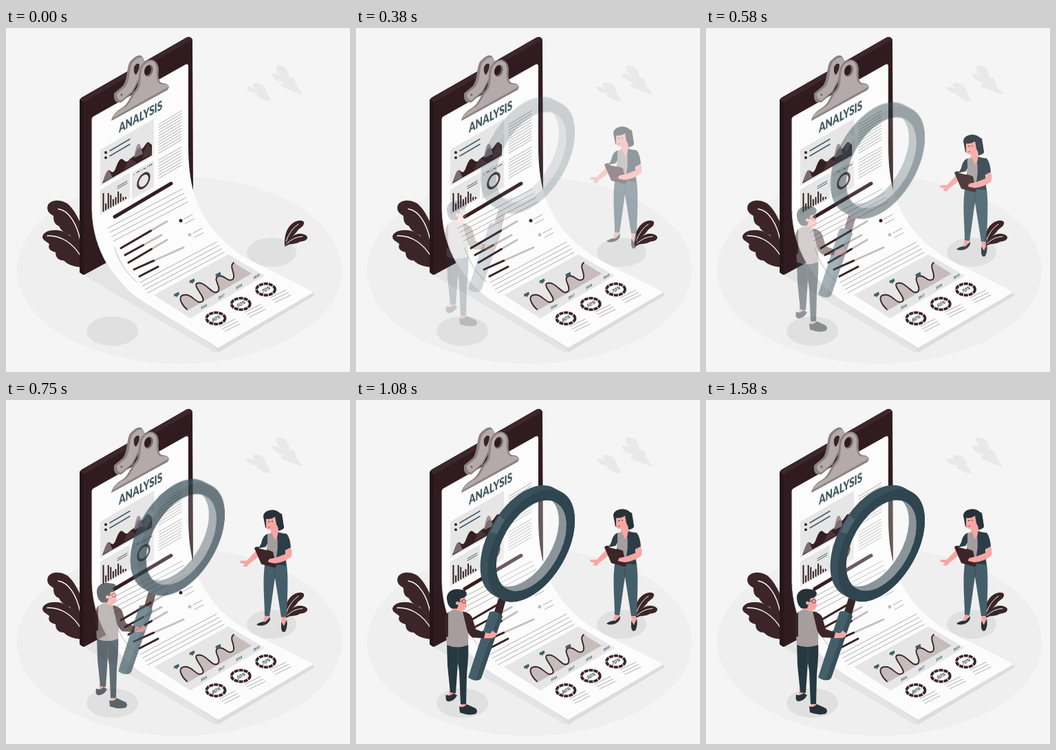
Write an HTML page that moves like this. It is 500 by 500 pixels and loops after 1620 ms.

```html
<!DOCTYPE html>
<html lang="en">
<head>
<meta charset="utf-8">
<title>Analysis</title>
<style>
html,body{margin:0;width:100%;height:100%;overflow:hidden;background:#f5f5f5}
svg{display:block;width:100vw;height:100vh}
text{font-family:Lato,sans-serif;font-weight:900;fill:#455a64}
.r{stroke-linecap:round;stroke-linejoin:round;fill:none}
</style>
</head>
<body>
<svg viewBox="0 0 500 500">
<!-- floor -->
<ellipse cx="252" cy="352" rx="236" ry="136" fill="#efefef"/>
<g fill="#e0e0e0">
  <ellipse cx="154.700" cy="440.500" rx="37.500" ry="21.500"/>
  <ellipse cx="386" cy="326" rx="36" ry="21"/>
  <path d="M113 359L147 338L215 390L310 467L304 472L200 411Z" fill="#e4e4e4"/>
</g>
<g fill="#e9e9e9">
  <path d="M386 67C392 65 398 68 403 72C396 67 391 61 393 55C401 53 411 58 412 72C417 71 421 75 421 82L432 97C424 95 412 90 402 86C397 84 400 80 405 79C397 79 389 75 386 67Z"/>
  <path d="M349 86C354 84 360 87 364 90C359 86 357 82 360 80C369 79 376 82 378 92L386 106C378 108 372 103 366 99C363 98 364 96 367 95C359 95 352 93 349 86Z"/>
</g>
<!-- plants -->
<g fill="#3b2528">
  <path d="M110 287C104 275 99 263 89 255C79 249 66 249 61 257C58 265 63 270 69 273C69 280 70 285 77 288C80 294 85 298 93 301L111 329Z"/>
  <path d="M111 325C104 311 94 300 81 295C68 292 55 295 53 303C53 309 59 310 63 314C60 322 66 324 72 326C72 335 78 338 84 338C91 345 100 347 111 348Z"/>
  <path d="M405 318C404 304 407 293 414 286C421 279 430 278 433 282C434 288 428 290 424 294C421 300 412 305 408 312Z"/>
  <path d="M406 318C409 306 419 298 429 299C437 300 440 304 437 307C434 311 429 309 425 312C419 315 412 312 406 318Z"/>
</g>
<g class="r" stroke="#fff" stroke-width="1.400">
  <path d="M76 263C91 265 103 284 108 309M60 302C78 301 97 311 110 334"/>
  <path d="M407 310Q413 293 425 285M409 313Q417 304 431 303" stroke-width="1"/>
</g>
<!-- board -->
<path d="M107 107Q107 103 110 101L262 14Q268 11 271 17L272 236L240 288L150 339L115 358Q112 360 107 355Z" fill="#301c20"/>
<path d="M107 104L113 108V359L107 355Z" fill="#26161a"/>
<path d="M107 104L113 108L265 20L271 17Q268 11 262 14Z" fill="#3c272b"/>
<!-- paper -->
<path d="M127 270C128 318 150 355 188 386L304 465L308 472L448 389L446 382L310 461L200 394Z" fill="#dcdcdc"/>
<path d="M125 132Q125 129 128 128L261 53Q265 51 265 56V170C265 200 268 222 273 239C284 277 311 312 350 335L447 384L308 465L199 398C158 371 126 323 125 264Z" fill="#fcfcfc"/>
<path d="M125 132V264C126 323 158 371 199 398L308 465" class="r" stroke="#e3e3e3"/>
<path d="M158 319C164 340 176 358 190 369" class="r" stroke="#a8a8a8" stroke-width=".8"/>
<text transform="matrix(.73 -.4 0 1 164 152.500)" font-size="18.500">ANALYSIS</text>
<!-- wall panels -->
<g fill="#e6e6e6">
  <path d="M137 177L215 132V186L137 230Z"/>
  <path d="M137 235L180 210V247L137 272Z"/>
  <path d="M183 210L215 192V231L183 249Z"/>
</g>
<path d="M140 226C144 214 147 205 151 207C154 210 156 211 159 205C163 194 166 188 170 191C174 195 176 195 179 192C183 187 185 188 188 184C191 174 194 173 197 176C201 174 204 165 207 166C210 167 211 171 212 169V185Z" fill="#341f23"/>
<path d="M141 224C144 213 147 204 150 207C153 212 153 214 155 217ZM186 189C188 177 190 168 193 168C197 170 197 178 199 183Z" fill="#8d8082" opacity=".8"/>
<path d="M171 207C176 196 179 188 182 190C186 194 187 194 190 196ZM198 190C201 180 203 170 207 167C210 171 211 178 212 184Z" fill="#583f43" opacity=".65"/>
<g fill="#341f23"><circle cx="145" cy="181" r="2"/><circle cx="145" cy="188.500" r="2"/><circle cx="254" cy="280" r="2.500"/></g>
<circle cx="267" cy="300.500" r="2.500" fill="#c5bdbe"/>
<g class="r" stroke="#455a64" stroke-width="1.500">
  <path d="M151 178.500L180 161.500M151 186L180 169"/>
  <path d="M162 230.500L176 222.500M162 233.500L176 225.500" stroke-width="1"/>
  <path d="M186 213h.1M190 210L194 208M197 206.500h.1M200 205L203 203.500M206 201.500h.1M208 200.500L212 198" stroke-width="1.300"/>
</g>
<g id="bars" stroke="#341f23" stroke-width="2"></g>
<circle r="9.700" transform="matrix(.866 -.5 0 1 200 222)" fill="none" stroke="#4a3438" stroke-width="3.200"/>
<g id="lines" class="r" stroke="#a3a3a3" stroke-width=".9"></g>
<g id="meters" class="r" stroke-width="3"></g>
<!-- lower chart -->
<path d="M215 388L323 329L376 360L268 422Z" fill="#e6e6e6"/>
<path id="area" fill="#c6bcbd"/>
<path id="wave" class="r" stroke="#3b2528" stroke-width="1.900"/>
<g fill="#41606a">
  <path id="flag" d="M244 387L251 383.500L252 387L250 389L248 391.500L247 389.500L244.500 390.500Z"/>
  <use href="#flag" x="22.500" y="-19.500"/><use href="#flag" x="60.500" y="-29"/>
</g>
<g id="labels"></g>
<g id="gauges"></g>
<!-- clip -->
<path d="M157 95L170 84C177 74 175 58 180 49Q190 38 196 40C203 44 203 58 199 66L184 94L168 108Q158 110 157 101Z" fill="#8d8283"/>
<path d="M161 96L174 85C181 74 179 58 184 50Q192 41 198 43C203 48 201 58 197 65L183 92L168 105Q161 105 161 96Z" fill="#b4aaab"/>
<path d="M186 57Q190 49 194 53Q194 61 189 68Q185 66 186 57Z" fill="#3b2528"/>
<circle cx="168" cy="97" r="1.600" fill="#6b5f61"/>
<path d="M153 135C154 126 163 119 170 115C178 110 180 99 187 91C195 83 191 70 195 57Q201 45 212 46Q221 48 222 60C221 71 222 79 227 80Q236 80 237 86L235 90Z" fill="#8d8283"/>
<path d="M155 131C157 124 166 119 173 115C181 110 183 100 190 92C198 84 194 71 198 58Q203 48 212 48Q219 50 219 61C218 73 220 81 226 82Q234 81 237 85Z" fill="#b4aaab"/>
<ellipse cx="207.500" cy="62" rx="6" ry="9" transform="rotate(18 207.500 62)" fill="#756a6c"/>
<ellipse cx="206" cy="61.500" rx="4.600" ry="7.500" transform="rotate(18 206 61.500)" fill="#301c20"/>

<g id="woman">
  <path d="M374 168C374 160 386 156 394 160C403 164 402 174 404 184C401 189 393 190 388 187L377 184Z" fill="#263238"/>
  <path d="M378 171L391 168L395 173L396 190L391 197L385 193V187Q379 188 378 183Z" fill="#f7a6a3"/>
  <path d="M375 171Q385 173 391 168L393 179L397 187Q402 188 404 184L401 164L384 159Z" fill="#263238"/>
  <path d="M381 175.500h2.500M386 175h2" stroke="#263238" stroke-width="1"/>
  <path d="M381 183.500l3-.5" stroke="#b5504f" stroke-width="1"/>
  <path d="M376 312L373 324L380 324L383 311ZM400 311L401 328L407 328L407 311Z" fill="#f7a6a3"/>
  <path d="M364 325Q371 320 377 321L384 314Q385 321 377 325Q369 328 364 325ZM400 321L404 327L408 318Q410 327 406 335Q401 338 400 330Z" fill="#263238"/>
  <path d="M377 232L407 232C411 252 409 284 408 314L400 314L391 257C388 276 386 294 383 313L376 312C376 288 372 259 377 232Z" fill="#455f6a"/>
  <path d="M391 257L391 244" stroke="#344b55" stroke-width="1"/>
  <path d="M380 193L397 190L405 194L407 236L378 238Z" fill="#a59d9e"/>
  <path d="M380 193Q373 196 371 207L366 216L373 220L380 207ZM393 191L408 193Q413 199 414 213L406 217L407 239L390 238Q398 214 393 191Z" fill="#2c3d46"/>
  <path d="M386 191L395 189Q396 198 391 202Z" fill="#f7a6a3"/>
  <path d="M366 215L372 220Q364 230 354 236L350 241L344 240L347 237L340 235L341 232L350 232Z" fill="#f7a6a3"/>
  <path d="M361 214Q363 211 367 212L388 219L393 240Q392 243 389 242L371 237Z" fill="#3b2528"/>
  <path d="M367 214L377 212L379 217Z" fill="#f5f5f5"/>
  <path d="M407 217L414 213Q417 222 414 227Q403 235 390 236L381 234Q381 229 386 229L394 227L407 222Z" fill="#f7a6a3"/>
</g>

<g id="glass">
  <path d="M207 288L218 290L211 315L200 311Z" fill="#3b2528"/>
  <path d="M194 308Q203 304 213 314L182 404Q174 411 163 403Z" fill="#455f6a"/>
  <path d="M208 310Q211 311 213 314L182 404Q179 408 174 407Z" fill="#385059"/>
  <!-- wall plane; the back rim sits at (-12.7, -12.4) from the front one -->
  <g transform="matrix(.866 -.5 0 1 254.800 211.400)">
    <circle r="59" fill="#fff" opacity=".27"/>
    <path d="M35 -47.500A59 59 0 1 1 -47.700 34.700A59 59 0 0 0 35 -47.500Z" fill="#8b9599"/>
    <path fill-rule="evenodd" d="M51.100 -52.200L38.400 -64.600A73 73 0 0 0 -63.800 39.800L-51.100 52.200A73 73 0 0 0 51.100 -52.200ZM59 0A59 59 0 1 0 -59 0A59 59 0 1 0 59 0Z" fill="#3a515c"/>
    <path d="M-63 -50A65 65 0 0 1 -49 -65" fill="none" stroke="#4d6670" stroke-width="14"/>
    <circle r="66" fill="none" stroke="#2f454f" stroke-width="14"/>
  </g>
</g>

<g id="man">
  <path d="M136 419L135 430L143 429L144 417ZM152 438L153 449L161 447L160 436Z" fill="#f7a6a3"/>
  <path d="M131 428Q136 431 142 426L147 429Q143 437 135 438Q129 438 131 428ZM150 445Q156 448 161 442L174 448Q178 452 174 456Q164 459 151 454Z" fill="#263238"/>
  <path d="M132 353L163 351C164 373 162 386 161 400L160 442L152 442L150 394L148 382L145 426L137 425L133 386Z" fill="#263840"/>
  <path d="M148 382L148 362" stroke="#3c505a" stroke-width="1"/>
  <path d="M140 297L154 302L155 312L141 310Z" fill="#f7a6a3"/>
  <path d="M145 287L158 284L160 292L161 298Q160 306 153 306L143 302Z" fill="#f7a6a3"/>
  <path d="M132 289C131 279 140 273 150 275Q161 275 161 282Q159 288 152 288L149 297L147 303L139 303Q133 299 132 289Z" fill="#263238"/>
  <circle cx="147.500" cy="295" r="2.500" fill="#f7a6a3"/>
  <path d="M149 293L154 292" stroke="#263238" stroke-width=".8"/>
  <circle cx="156.800" cy="292.500" r="2.700" fill="none" stroke="#263238" stroke-width=".8"/>
  <path d="M134 308L142 304L155 308L164 316L163 356Q147 362 132 356Q129 325 134 308Z" fill="#a59d9e"/>
  <path d="M155 307Q166 309 169 316L174 333L188 338L186 346L169 345Q162 340 160 328Z" fill="#3b2528"/>
  <path d="M134 308Q129 313 130 325L131 344L134 344Z" fill="#3b2528"/>
  <path d="M188 338L195 339L199 335L202 338L205 339Q204 344 198 346L186 346Z" fill="#f7a6a3"/>
</g>
</svg>
<script>
const $ = id => document.getElementById(id);
const LOOP = 1620, BLANK = 130, DROP = 30;
const seg = (x1, y1, x2, y2, attrs = '') => `<path d="M${x1} ${y1}L${x2} ${y2}" ${attrs}/>`;

// rows of thin text lines: start, end, step, count
const rows = (x1, y1, x2, y2, dx, dy, n) => Array.from({length: n}, (_, i) =>
  seg(x1 + dx * i, y1 + dy * i, x2 + dx * i, y2 + dy * i)).join('');

$('lines').innerHTML = [
  [222, 140, 255, 120.500, 0, 4.200, 11],
  [222, 192, 255, 173, 0, 4.400, 7],
  [148, 291, 256, 234, 2.800, 6.200, 4],
  [195, 370, 306, 311, 3.700, 5, 4],
  [258, 278, 271, 271, 2, 6.500, 2],
  [272, 298, 285, 291, 2, 6.500, 2],
  [311, 434, 333, 423, 3.500, 3.500, 3],
  [347, 413, 370, 402, 3.500, 3.500, 3],
  [384, 392, 407, 381, 3.500, 3.500, 3]
].map(r => rows(...r)).join('');

$('bars').innerHTML = [27, 10, 23, 18, 10, 11, 17, 12, 5, 3].map((h, i) => {
  const x = 141.500 + i * 3.600, y = 267 - i * 2.050;
  return seg(x, y, x, y - h);
}).join('');

$('meters').innerHTML = seg(158, 274.500, 240, 226, 'stroke="#341f23" stroke-width="5"') + [
  [167, 320, 234, 281, .65], [173, 330, 226, 301, .5], [178, 341, 234, 308, .6],
  [186, 351, 258, 319, .4], [194, 361, 221, 347, 1]
].map(([x, y, u, v, k]) => seg(x, y, u, v, 'stroke="#c5bdbe"') +
  seg(x, y, x + (u - x) * k, y + (v - y) * k, 'stroke="#3b2528"')).join('');

const wave = 'M263 409C255 402 249 390 258 388C271 385 277 404 286 397C291 392 270 374 278 371C290 367 300 390 308 383C314 377 300 365 308 361C317 357 322 371 330 365C335 358 323 347 331 341';
$('wave').setAttribute('d', wave);
$('area').setAttribute('d', wave + 'L357 357L263 411Z');

const slant = (s, x, y, size) =>
  `<text transform="translate(${x} ${y}) rotate(-30) skewX(-20)" font-size="${size}" text-anchor="middle">${s}</text>`;
$('labels').innerHTML = [2016, 2017, 2018, 2019].map((s, i) =>
  slant(s, 288 + i * 25.500, 406.500 - i * 14.600, 4.500)).join('');
$('gauges').innerHTML = ['80%', '50%', '70%'].map((s, i) => {
  const x = 305 + i * 36.300, y = 422 - i * 21;
  return `<ellipse cx="${x}" cy="${y}" rx="13.500" ry="8.300" fill="#fcfcfc" stroke="#3b2528" stroke-width="3.800" stroke-dasharray="6 1"/>` +
    slant(s, x + 1, y + 2.500, 7);
}).join('');

// cubic-bezier(.36,-.01,.5,1.38), solved by bisection
const bez = (a, b, u) => 3 * (1 - u) * u * ((1 - u) * a + u * b) + u ** 3;
function ease(x) {
  if (x >= 1) return 1;
  let lo = 0, hi = 1;
  for (let i = 0; i < 24; i++) {
    const mid = (lo + hi) / 2;
    bez(.36, .5, mid) < x ? lo = mid : hi = mid;
  }
  return bez(-.01, 1.38, lo);
}

function drop(id, t, duration) {
  const p = ease(t / duration), el = $(id);
  el.setAttribute('transform', `translate(0 ${(-DROP * (1 - p)).toFixed(3)})`);
  el.setAttribute('opacity', t < BLANK ? 0 : Math.max(0, Math.min(1, p)).toFixed(4));
}

function draw(t) {
  drop('woman', t, 1000);
  drop('glass', t, 1560);
  drop('man', t, 1560);
}

const start = performance.now();
function tick() {
  draw((performance.now() - start) % LOOP);
  requestAnimationFrame(tick);
}
draw(0);
requestAnimationFrame(tick);
</script>
</body>
</html>
```
